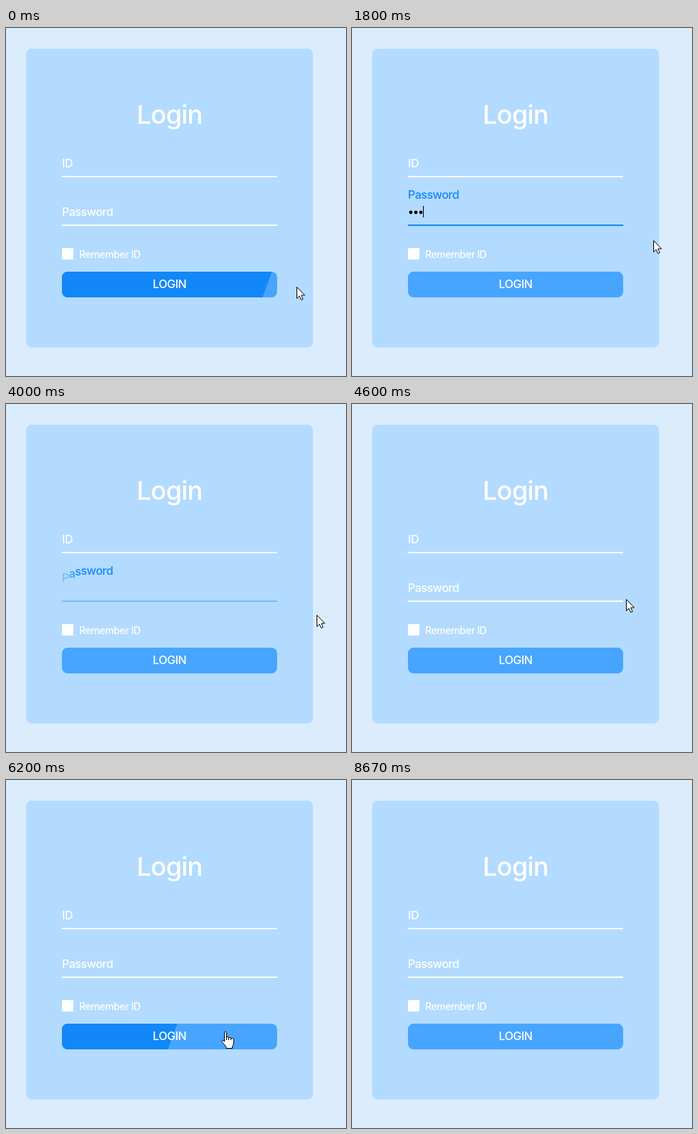
These frames come from a looping animation (474 by 487 pixels, 9140 ms). An HTML page:

```html
<!DOCTYPE html>
<html lang="en">
<head>
<meta charset="utf-8">
<title>Login form</title>
<style>
  html, body { margin: 0; width: 100%; height: 100%; overflow: hidden; background: #dbecfd; }
  svg { display: block; }
  text { font: 500 16px Inter, sans-serif; font-optical-sizing: none; letter-spacing: -.03em; fill: #fff; }
  text.title { font-size: 36px; letter-spacing: -.02em; }
  text.small { font-size: 14px; }
  .cursor { fill: #fff; stroke: #000; stroke-linejoin: round; }
</style>
</head>
<body>
<svg width="474" height="487" viewBox="0 0 474 487">
  <clipPath id="buttonShape"><rect x="78" y="341" width="300" height="36" rx="8"/></clipPath>
  <rect x="28" y="29" width="400" height="418" rx="8" fill="#b3dbff"/>
  <text class="title" x="228" y="134" text-anchor="middle">Login</text>
  <text x="78" y="195">ID</text>
  <rect x="78" y="207" width="300" height="2" fill="#fff"/>
  <text id="label" x="78" y="263"></text>
  <rect id="line" x="78" y="275" width="300" height="2"/>
  <g id="dots">
    <circle cx="82" cy="258" r="2.4"/>
    <circle cx="89" cy="258" r="2.4"/>
    <circle cx="96" cy="258" r="2.4"/>
  </g>
  <rect id="caret" y="249" width="1" height="16"/>
  <rect id="box" x="78" y="308" width="16" height="16"/>
  <text class="small" x="102" y="322">Remember ID</text>
  <g clip-path="url(#buttonShape)">
    <rect x="78" y="341" width="300" height="36" fill="#47a5ff"/>
    <path id="sweep" d="M-400 341H6.5L-6.5 377H-400Z" fill="#1287f8"/>
  </g>
  <text x="228" y="364" text-anchor="middle">LOGIN</text>
  <g id="cursor">
    <path id="arrow" class="cursor" d="M.5 .5V16.5L4 13L6.5 18.5L9 17.5L6.7 12H11.5Z"/>
    <path id="hand" class="cursor" d="M-1.5 14V1.5Q-1.5 .5 0 .5T1.5 1.5V8Q3 6.5 4.5 8V9Q6 7.5 7.5 9V10Q9.5 8.5 11.5 10.5V16Q11 19.5 9.5 21V23.5H1V21.5Q-2 18 -5.5 13.5Q-5 10.5 -1.5 14ZM4.5 8V12M7.5 9V12M1.5 8V12"/>
    <path id="beam" fill="none" stroke="#000" d="M-3 -7.5H3M.5 -7.5V7.5M-3 7.5H3"/>
  </g>
</svg>
<script>
const LOOP = 9140;
const BLUE = [18, 135, 248];
const $ = id => document.getElementById(id);
const show = (id, visible) => $(id).setAttribute('visibility', visible ? 'visible' : 'hidden');

function bezier(x1, y1, x2, y2) {
  const at = (u, a, b) => 3 * (1 - u) ** 2 * u * a + 3 * (1 - u) * u * u * b + u ** 3;
  return x => {
    if (x <= 0) return 0;
    if (x >= 1) return 1;
    let low = 0, high = 1;
    for (let i = 0; i < 24; i++) {
      const mid = (low + high) / 2;
      if (at(mid, x1, x2) < x) low = mid; else high = mid;
    }
    return at(low, y1, y2);
  };
}
const ease = bezier(.25, .1, .25, 1);
const spring = bezier(.4, 0, .3, 1.5);

// Times at which each state flips; every list starts by switching off.
const raised = [-1000, 440, 3910, 4780, 5330];
const hovered = [-24, 6110, 6680];
const checked = [-1000, 7440, 8100];
const focusSpans = [[440, 2130], [3000, 3910], [4780, 5330]];
const typed = [930, 1070, 1200];
const deleted = [3130, 3270, 3400];

function transition(t, flips, duration, easing) {
  let index = 0;
  flips.forEach((time, i) => { if (t >= time) index = i; });
  const p = easing((t - flips[index]) / duration);
  return index % 2 ? p : 1 - p;
}

// time, x, y of the pointer's hot spot
const path = [
  [0, 405, 362], [330, 345, 262], [1560, 345, 262], [1800, 420, 297],
  [2000, 446, 306], [2200, 446, 306], [2470, 394, 291], [2800, 352, 271],
  [3430, 352, 271], [3730, 432, 295], [4000, 433, 295], [4350, 433, 295],
  [4730, 355, 262], [4900, 355, 262], [5200, 440, 306], [5480, 440, 306],
  [5670, 428, 320], [6100, 378, 345], [6200, 306, 352], [6640, 306, 352],
  [6720, 285, 338], [7130, 164, 313], [8130, 164, 313], [8600, 38, 450]
];

function pointerAt(t) {
  const i = path.findIndex(key => key[0] > t);
  if (i < 0) return path.at(-1).slice(1);
  const [a, b] = [path[i - 1], path[i]];
  const p = (t - a[0]) / (b[0] - a[0]);
  return [1, 2].map(k => Math.round(a[k] + (b[k] - a[k]) * p));
}

const tint = p => {
  const k = Math.max(0, Math.min(1, p));
  return `rgb(${BLUE.map(c => Math.round(255 + (c - 255) * k))})`;
};

const letters = [...'Password'].map(char => {
  const span = document.createElementNS('http://www.w3.org/2000/svg', 'tspan');
  span.textContent = char;
  $('label').append(span);
  return span;
});

function drawField(t) {
  let previous = 0;
  letters.forEach((span, i) => {
    const p = transition(t, raised.map(time => time + i * 30), 300, spring);
    const lift = -24 * p;
    span.setAttribute('dy', lift - previous);
    span.setAttribute('fill', tint(p));
    span.style.fill = tint(p);
    previous = lift;
  });
  $('line').setAttribute('fill', tint(transition(t, raised, 300, spring)));
  const passed = times => times.filter(time => t >= time).length;
  const count = passed(typed) - passed(deleted);
  [...$('dots').children].forEach((dot, i) => dot.setAttribute('visibility', i < count ? 'visible' : 'hidden'));
  show('caret', focusSpans.some(([from, to]) => t >= from && t < to));
  $('caret').setAttribute('x', 78 + 7 * count);
}

function drawPointer(t) {
  const [x, y] = pointerAt(t);
  const inside = (left, top, right, bottom) => x >= left && x < right && y >= top && y < bottom;
  const hand = inside(78, 341, 378, 377) || inside(78, 308, 188, 326);
  const beam = inside(78, 245, 378, 277);
  const visible = t < 8640;
  $('cursor').setAttribute('transform', `translate(${x} ${y})`);
  show('hand', visible && hand);
  show('beam', visible && beam);
  show('arrow', visible && !hand && !beam);
}

function draw(now) {
  const t = now % LOOP;
  drawField(t);
  $('box').setAttribute('fill', tint(transition(t, checked, 200, ease)));
  $('sweep').setAttribute('transform', `translate(${71 + 314 * transition(t, hovered, 300, ease)})`);
  drawPointer(t);
}

let start;
function tick(now) {
  start ??= now;
  draw(now - start);
  requestAnimationFrame(tick);
}
draw(0);
requestAnimationFrame(tick);
</script>
</body>
</html>
```
